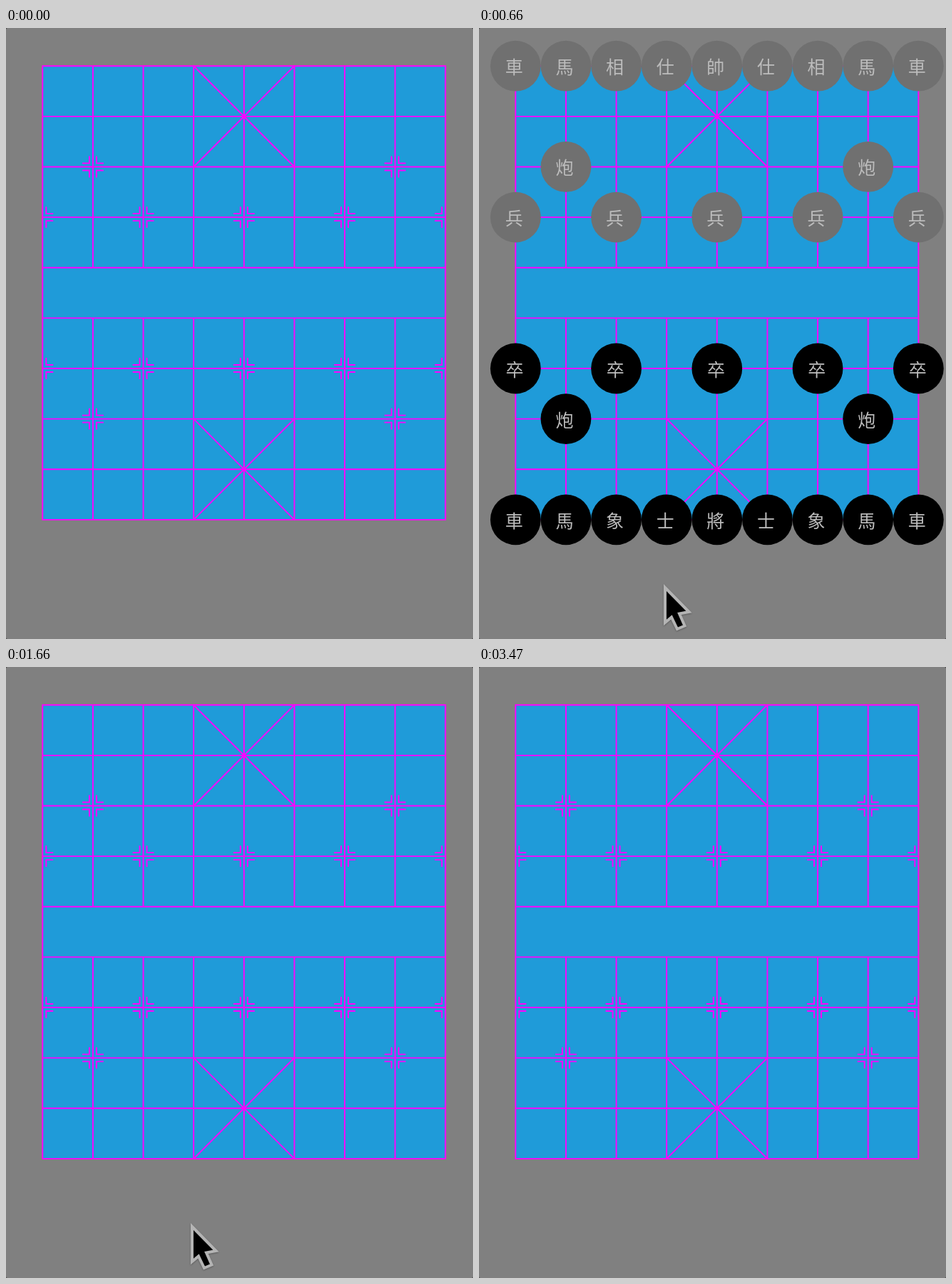
Write an HTML page that moves like this. It is 655 px wide and 856 px high and loops after 3.67 s.

```html
<!DOCTYPE html>
<html lang="zh-Hant">
<head>
<meta charset="utf-8">
<title>Xiangqi board</title>
<style>
html, body { margin: 0; width: 100%; height: 100%; overflow: hidden; background: #808080; }
svg { display: block; width: 655px; height: 856px; }
text { font: 500 25px "Noto Sans CJK TC", "Noto Sans CJK", "Noto Sans CJK SC", "Noto Sans CJK JP", sans-serif; text-anchor: middle; fill: #bcbcbc; }
#cursor { filter: drop-shadow(0 1px 1px rgba(0, 0, 0, .3)); }
</style>
</head>
<body>
<svg viewBox="0 0 655 856">
  <rect width="655" height="856" fill="#404040"/>
  <rect width="655" height="856" rx="2.5" fill="#808080"/>
  <g id="board"></g>
  <g id="pieces"></g>
  <g id="cursor">
    <path d="M261 784V833L270 825.5L278 842L288.500 837.500L281 820.500L294.500 818Z" fill="#000" stroke="#b4b4b4" stroke-width="4" stroke-miterlimit="8"/>
  </g>
</svg>
<script>
const LOOP = 3670;
const X0 = 51.3, Y0 = 53.2, STEP = 70.63;
const $ = id => document.getElementById(id);
const px = col => X0 + col * STEP;
const py = row => Y0 + row * STEP;

const line = (c1, r1, c2, r2) => `M${px(c1)} ${py(r1)}L${px(c2)} ${py(r2)}`;

// Four corner brackets around a point, kept inside the board
function mark(col, row) {
  let d = "";
  for (const sx of [-1, 1]) {
    if (col + sx < 0 || col + sx > 8) continue;
    for (const sy of [-1, 1]) {
      const x = px(col) + sx * 5, y = py(row) + sy * 5;
      d += `M${x + sx * 9} ${y}H${x}V${y + sy * 9}`;
    }
  }
  return d;
}

function drawBoard() {
  let grid = "", marks = "";
  for (let r = 0; r < 10; r++) grid += line(0, r, 8, r);
  for (let c = 0; c < 9; c++) {
    const edge = c % 8 === 0;
    grid += edge ? line(c, 0, c, 9) : line(c, 0, c, 4) + line(c, 5, c, 9);
  }
  for (const r of [0, 7]) grid += line(3, r, 5, r + 2) + line(5, r, 3, r + 2);
  for (const r of [2, 7]) marks += mark(1, r) + mark(7, r);
  for (const r of [3, 6]) for (let c = 0; c < 9; c += 2) marks += mark(c, r);
  $("board").innerHTML =
    `<rect x="${X0}" y="${Y0}" width="${8 * STEP}" height="${9 * STEP}" fill="#1f9bd9"/>` +
    `<path d="${grid}${marks}" fill="none" stroke="#f0f" stroke-width="1.9" stroke-linecap="square"/>`;
}

function drawPieces() {
  const rows = [
    [0, "車馬相仕帥仕相馬車"], [2, " 炮     炮 "], [3, "兵 兵 兵 兵 兵"],
    [6, "卒 卒 卒 卒 卒"], [7, " 炮     炮 "], [9, "車馬象士將士象馬車"]
  ];
  let out = "";
  for (const [row, names] of rows) {
    [...names].forEach((name, col) => {
      if (name === " ") return;
      const x = px(col), y = py(row);
      out += `<circle cx="${x}" cy="${y}" r="35.4" fill="${row < 5 ? "#707070" : "#000"}"/>` +
        `<text x="${x - (row === 6 ? 1.2 : 2)}" y="${y + 11}">${name}</text>`;
    });
  }
  $("pieces").innerHTML = out;
}

const show = (id, on) => $(id).setAttribute("visibility", on ? "visible" : "hidden");

function render(t) {
  show("cursor", t >= 330 && t < 3160);
  $("cursor").setAttribute("transform", t < 500 ? "translate(11 37)" : "translate(0 0)");
  show("pieces", t >= 660 && t < 1660);
}

drawBoard();
drawPieces();
const start = performance.now();
function tick() {
  render((performance.now() - start) % LOOP);
  requestAnimationFrame(tick);
}
tick();
</script>
</body>
</html>
```
